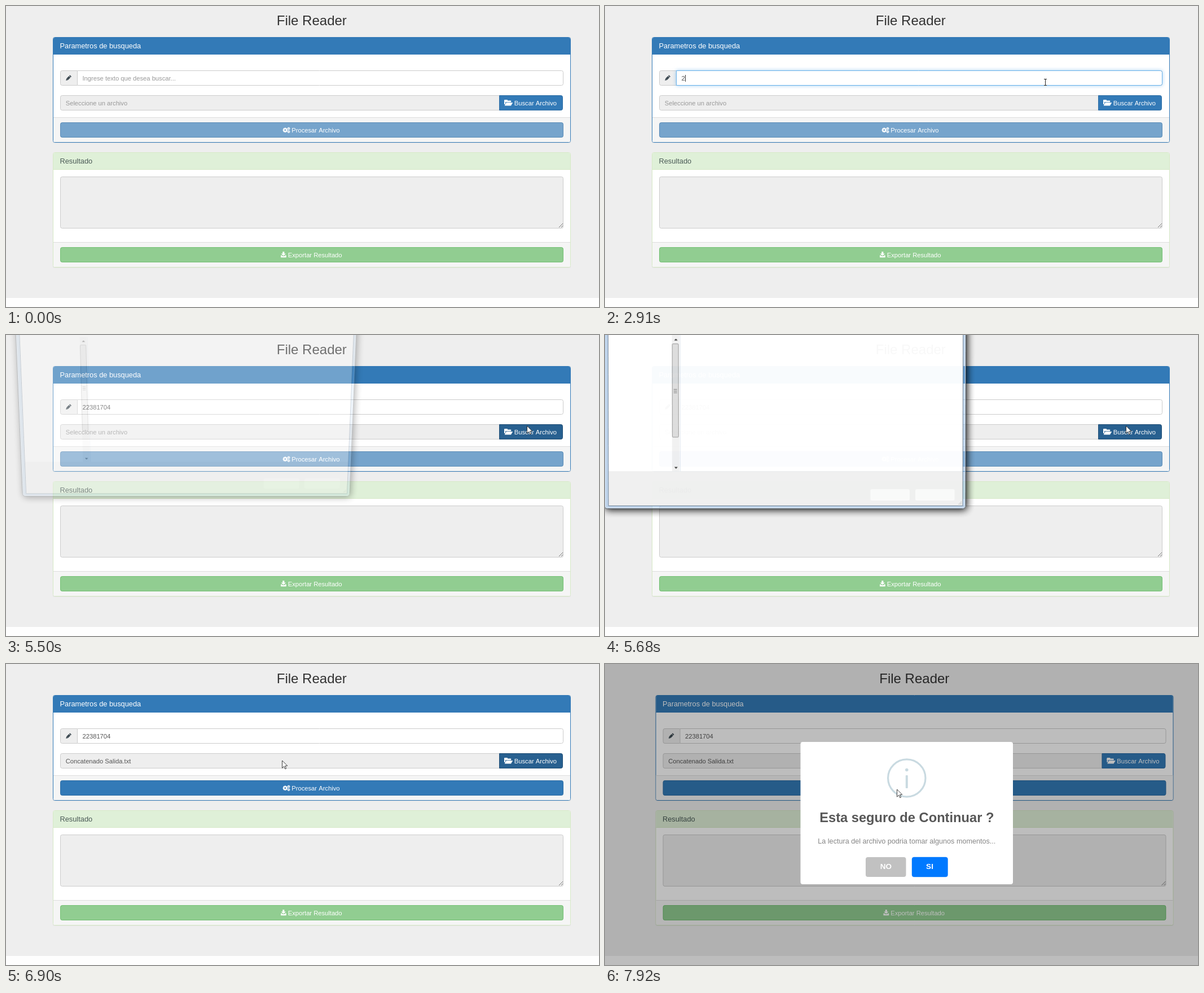
Animation, 1051 px wide and 533 px high, one loop 7.99 s. Source, as an HTML page with a canvas:

```html
<!DOCTYPE html>
<html lang="es">
<head>
<meta charset="utf-8">
<title>File Reader</title>
<style>
html, body { margin: 0; width: 100%; height: 100%; overflow: hidden; background: #eee; }
canvas { display: block; }
</style>
</head>
<body>
<canvas id="stage" width="1051" height="533"></canvas>
<script>
const LOOP = 7990;
const ARIAL = '"Liberation Sans", Arial, sans-serif';
const UI = '"Open Sans", "Noto Sans", sans-serif';
const BLUE = '#337ab7', BLUE_EDGE = '#2e6da4', BLUE_DARK = '#286090', BLUE_DEEP = '#204d74';

const main = document.getElementById('stage').getContext('2d');
const layer = document.createElement('canvas');
layer.width = 720;
layer.height = 360;
const OX = 30, OY = 20;
let c = main;

const clamp = v => Math.max(0, Math.min(1, v));
const ramp = (t, start, length) => clamp((t - start) / length);
const inside = (p, x, y, w, h) => p && p.x >= x && p.x < x + w && p.y >= y && p.y < y + h;

function rect(x, y, w, h, fill) {
  c.fillStyle = fill;
  c.fillRect(x, y, w, h);
}

function rounded(x, y, w, h, r, fill) {
  c.beginPath();
  c.roundRect(x, y, w, h, r);
  c.fillStyle = fill;
  c.fill();
}

// Box on whole pixels with an inner one pixel border.
function framed(x, y, w, h, r, fill, edge) {
  c.beginPath();
  c.roundRect(x + .5, y + .5, w - 1, h - 1, r);
  if (fill) { c.fillStyle = fill; c.fill(); }
  c.strokeStyle = edge;
  c.stroke();
}

function poly(fill, pts, stroke) {
  c.beginPath();
  for (let i = 0; i < pts.length; i += 2) c.lineTo(pts[i], pts[i + 1]);
  c.closePath();
  c.fillStyle = fill;
  c.fill();
  if (stroke) { c.strokeStyle = stroke; c.stroke(); }
}

function disc(x, y, r, fill) {
  c.beginPath();
  c.arc(x, y, r, 0, 7);
  c.fillStyle = fill;
  c.fill();
}

function text(s, x, y, size, color, align = 'left', family = ARIAL, weight = '') {
  c.font = `${weight} ${size}px ${family}`;
  c.textAlign = align;
  c.fillStyle = color;
  c.fillText(s, x, y);
}

const small = (s, x, y, color) => text(s, x, y, 11.2, color);
const label = (s, x, y, color = '#000', align) => text(s, x, y, 9, color, align, UI);

function at(x, y, scale, draw, turn = 0) {
  c.save();
  c.translate(x, y);
  c.rotate(turn);
  c.scale(scale, scale);
  draw();
  c.restore();
}

function vertical(y, h, a, b) {
  const g = c.createLinearGradient(0, y, 0, y + h);
  g.addColorStop(0, a);
  g.addColorStop(1, b);
  return g;
}

/* ---------- cursor ---------- */

// Each move starts where the last one ended: start, end, x, y, sideways bend.
const moves = [
  [70, 230, 942, 398, 0],
  [390, 1170, 866, 157, -220],
  [1250, 1410, 890, 165, 0],
  [1490, 1830, 780, 135, 0],
  [4610, 5360, 923, 161, 0],
  [5890, 6420, 489, 171, -47],
  [7200, 7430, 513, 227, 0],
  [7580, 7660, 517, 222, 0]
];

function cursorAt(t) {
  if (t < moves[0][0]) return null;
  let x = 966, y = 530;
  for (const [start, end, tx, ty, bend] of moves) {
    if (t < start) break;
    const steps = Math.round((end - start) / 78) + 1;
    const u = Math.min(1, (Math.floor((t - start) / (end - start) * (steps - 1)) + 1) / steps);
    const e = 1 - (1 - u) ** 3;
    const dx = tx - x, dy = ty - y, side = 4 * e * (1 - e) * bend / Math.hypot(dx, dy);
    x += dx * e - dy * side;
    y += dy * e + dx * side;
  }
  return { x, y };
}

function drawCursor(p, beam) {
  if (!p) return;
  const x = Math.round(p.x), y = Math.round(p.y);
  if (beam) {
    rect(x, y - 5, 1, 10, '#222');
    for (const end of [-6, 5]) rect(x - 2, y + end, 5, 1, '#222');
    return;
  }
  at(x + .5, y, .8, () =>
    poly('#fff', [0, 0, 0, 16.5, 4, 12.8, 6.6, 18.6, 9, 17.5, 6.5, 11.8, 11.5, 11.5], '#111'));
}

/* ---------- page ---------- */

function pencil() {
  at(110.5, 127.8, 1, () => {
    const ink = '#3d4a52';
    rounded(-2, -6, 4, 2, .8, ink);
    rect(-2, -3.4, 4, 6, ink);
    poly(ink, [-2, 2.6, 2, 2.6, 0, 6]);
  }, Math.PI / 4);
}

function folderOpen() {
  rounded(883, 166, 6, 4, 1, '#fff');
  rounded(883, 167.5, 12.3, 2.7, 1, '#fff');
  rect(883, 168, 2, 6, '#fff');
  poly('#fff', [886.8, 171, 898.2, 171, 895, 176.6, 883.6, 176.6]);
}

function gear(x, y, r, teeth) {
  c.strokeStyle = '#fff';
  c.lineWidth = r * .5;
  c.beginPath();
  c.arc(x, y, r * .58, 0, 7);
  for (let i = 0; i < teeth; i++) {
    const a = i / teeth * Math.PI * 2, cx = Math.cos(a), sy = Math.sin(a);
    c.moveTo(x + cx * r * .7, y + sy * r * .7);
    c.lineTo(x + cx * r, y + sy * r);
  }
  c.stroke();
  c.lineWidth = 1;
}

function gears() {
  gear(494.8, 219.7, 4.2, 8);
  for (const y of [217, 222.6]) gear(501, y, 2.5, 6);
}

function downloadIcon() {
  rect(490.3, 435, 3, 4, '#fff');
  poly('#fff', [487.6, 438.5, 496, 438.5, 491.8, 442.5]);
  rounded(487, 443, 9.7, 2.2, .5, '#fff');
  for (const x of [487, 494.2]) rect(x, 441.5, 2.5, 2, '#fff');
}

function panel(y, h, head, edge, title, color, footY) {
  rounded(83, y + 1, 918, h, 3, 'rgba(0,0,0,.05)');
  framed(83, y, 918, h, 3, '#fff', edge);
  rounded(84, y + 1, 916, 30, [2.5, 2.5, 0, 0], head);
  rect(84, y + 30, 916, 1, edge);
  text(title, 95.5, y + 20, 12.8, color);
  rounded(84, footY, 916, y + h - 1 - footY, [0, 0, 2.5, 2.5], '#f5f5f5');
  rect(84, footY, 916, 1, '#ddd');
}

function wideButton(y, fill, edge, alpha, icon, caption, x) {
  c.globalAlpha = alpha;
  framed(96, y, 892, 27, 3, fill, edge);
  c.globalAlpha = 1;
  icon();
  small(caption, x, y + 17.6, '#fff');
}

const PHRASE = '22381704', FIRST_KEY = 2910, KEY_GAP = 167;
const FOCUS = 2040, BLUR = 5210, BLINK = 530;

function searchField(t) {
  const glow = ramp(t, FOCUS - 10, 160) * (1 - ramp(t, BLUR, 150));
  const right = [0, 3, 3, 0];
  framed(96, 114, 31, 27, [3, 0, 0, 3], '#eee', '#ccc');
  pencil();
  c.save();
  c.shadowColor = `rgba(102,175,233,${.6 * glow})`;
  c.shadowBlur = 6;
  rounded(126, 114, 862, 27, right, '#fff');
  c.restore();
  framed(126, 114, 862, 27, right, '#fff', '#ccc');
  framed(126, 114, 862, 27, right, null, `rgba(102,175,233,${glow})`);

  const count = Math.max(0, Math.min(PHRASE.length, Math.floor((t - FIRST_KEY) / KEY_GAP) + 1));
  if (count) small(PHRASE.slice(0, count), 135.5, 131.8, '#555');
  else small('Ingrese texto que desea buscar...', 135.5, 131.8, '#999');

  const touched = count ? FIRST_KEY + KEY_GAP * (count - 1) : FOCUS;
  if (t >= FOCUS && t < BLUR && (t - touched) % (2 * BLINK) < BLINK)
    rect(136 + Math.round(count * 6.3), 122, 1, 12, '#333');
}

function page(t, p) {
  const loaded = t >= 6900;
  text('File Reader', 541.8, 33.7, 24, '#333', 'center');

  panel(55, 187, BLUE, BLUE, 'Parametros de busqueda', '#fff', 197);
  searchField(t);
  framed(96, 158, 779, 27, [3, 0, 0, 3], '#eee', '#ccc');
  small(loaded ? 'Concatenado Salida.txt' : 'Seleccione un archivo', 105.7, 175.6, loaded ? '#555' : '#999');
  const lit = t >= BLUR && t < 7430 || inside(p, 874, 158, 113, 27);
  framed(874, 158, 113, 27, [0, 3, 3, 0], lit ? BLUE_DARK : BLUE, lit ? BLUE_DEEP : BLUE_EDGE);
  folderOpen();
  small('Buscar Archivo', 900.8, 175.6, '#fff');

  let go = BLUE;
  if (t >= 7200 && t < 7920 && inside(p, 96, 206, 892, 27)) go = t < 7810 ? BLUE_DARK : BLUE_DEEP;
  wideButton(206, go, BLUE_EDGE, loaded ? 1 : .65, gears, 'Procesar Archivo', 506.3);

  panel(259, 204, '#dff0d8', '#d6e9c6', 'Resultado', '#4a5a56', 418);
  framed(96, 302, 892, 92, 3, '#eee', '#ccc');
  c.strokeStyle = '#777';
  c.beginPath();
  for (const size of [7, 3]) {
    c.moveTo(987 - size, 392);
    c.lineTo(987, 392 - size);
  }
  c.stroke();
  wideButton(427, '#5cb85c', '#4cae4c', .65, downloadIcon, 'Exportar Resultado', 499.8);
}

/* ---------- file dialog ---------- */

// Every icon fills a box of 38 by 38.
const icons = {
  folder() {
    ['#d8a93f', '#f3d67d', '#fbe9a9'].forEach((tone, i) => {
      const x = 22 - i * 7;
      poly(tone, [x, 1 + i, x + 10, 4 + i, x + 10, 35 + i, x, 31 + i]);
    });
  },
  lib() {
    for (let i = 0; i < 3; i++) framed(3 + i * 8, 1 + i * 3, 18, 28, 1, '#f1d078', '#cda044');
    framed(0, 15, 38, 21, 2, vertical(15, 21, '#fdeeb4', '#efc75e'), '#d8ac48');
    rounded(7, 30, 24, 7, 3, '#8cc4ea');
  },
  user() {
    icons.folder();
    rounded(17, 24, 18, 14, [8, 8, 1, 1], '#5f6f58');
    disc(26, 18, 6, '#c08d5c');
  },
  home() {
    ['#4f9ad8', '#2f62b8', '#4da23c'].forEach((tone, i) => {
      const x = 25 - 16 * (i % 2), y = 9 + i * 9;
      disc(x, y, 9, tone);
      disc(x - 2, y - 3, 4, 'rgba(255,255,255,.5)');
    });
    disc(34, 19, 5, '#9bd0ee');
  },
  pc() {
    rounded(1, 9, 12, 22, 1, '#c9cfd5');
    poly('#2f3b48', [9, 3, 37, 7, 35, 29, 10, 30]);
    poly('#2456b4', [12, 6, 34, 9, 33, 26, 12, 27]);
    poly('#86b6ee', [12, 6, 34, 9, 12, 22]);
    rounded(13, 32, 20, 4, 2, '#bcc4cc');
  },
  net() {
    disc(16, 16, 16, '#2f7fc4');
    disc(10, 12, 7, '#5aae50');
    disc(21, 6, 4, '#5aae50');
    at(12, 12, .68, icons.pc);
  },
  note() {
    framed(5, 3, 28, 34, 1, '#fafbfc', '#9aa3ab');
    for (let y = 9; y < 35; y += 3) rect(8, y, 22, 1, '#c6cdd4');
    for (let x = 7; x < 31; x += 3) rect(x, 1, 1.5, 4, '#77828c');
  },
  star() {
    const pts = [];
    for (let i = 0; i < 10; i++) {
      const a = i * Math.PI / 5 - Math.PI / 2, r = i % 2 ? 9 : 20;
      pts.push(19 + r * Math.cos(a), 20 + r * Math.sin(a));
    }
    poly('#f8b63c', pts, '#d98a1c');
  },
  down() {
    icons.folder();
    rect(24, 16, 8, 11, '#2f7fd0');
    poly('#2f7fd0', [18, 26, 38, 26, 28, 38]);
  },
  cloud() { disc(19, 19, 15, '#1f7fd6'); },
  image() {
    framed(1, 5, 36, 28, 1, '#e8f2fa', '#6f8ba5');
    rect(5, 9, 28, 20, vertical(9, 20, '#6fb1e6', '#4d8a4a'));
  },
  music() {
    rect(15, 2, 4, 28, '#2b78c8');
    poly('#2b78c8', [17, 2, 32, 12, 29, 20, 17, 11]);
    disc(12, 30, 7, '#2b78c8');
  },
  video() {
    rect(3, 3, 32, 32, '#37424d');
    rect(9, 6, 20, 26, '#6fa9dc');
    for (let y = 6; y < 33; y += 7) for (const x of [4, 31]) rect(x, y, 3, 3, '#fff');
  }
};

const groups = [
  ['star Favoritos', 'down Descargas', 'cloud Nublero', 'pc Escritorio', 'note Sitios recientes'],
  ['lib Bibliotecas', 'note Documentos', 'image Imágenes', 'music Música', 'video Vídeos'],
  ['home Grupo en el hogar']
];

const SYS = 'Carpeta de sistema', DOC = 'Documento de texto', PICKED = 'Concatenado Salida.txt';
const files = [
  ['lib', 'Bibliotecas', SYS], ['home', 'Grupo en el hogar', SYS],
  ['user', 'PC-ESTUDIO', SYS], ['pc', 'Equipo', SYS],
  ['net', 'Red', SYS], ['folder', 'ReaderFile', 'Carpeta de archivos'],
  ['note', 'comandos linux.txt', DOC, '37 bytes'], ['note', PICKED, DOC, '3,87 MB'],
  ['note', 'PENDIENTES CD.txt', DOC, '92 bytes'], ['note', 'php artisan.txt', DOC, '73 bytes']
];

function sidebar() {
  let y = 17;
  for (const group of groups) {
    group.forEach((entry, i) => {
      const [icon, ...words] = entry.split(' '), x = i ? 46 : 38;
      at(x - 17, y - 6, .31, icons[icon]);
      label(words.join(' '), x - .5, y + 3.2);
      y += 16.9;
    });
    y += 16.9;
  }
}

function fileList(t, p) {
  const tile = (a, b, edge) => framed(349, 141, 202, 42, 2, vertical(141, 42, a, b), edge);
  if (t >= 6420) tile('#e3f1fd', t < 6570 ? '#cfe6fb' : '#b9dbf9', '#84acdd');
  else if (inside(p, 349, 141, 202, 42)) tile('#fbfdff', '#edf5fd', '#c4dff5');
  files.forEach(([icon, name, kind, size], i) => {
    const x = i % 2 ? 395.3 : 190.8;
    const y = 23 + (i >> 1) * 45 - (size ? 6 : 0);
    at(x - 42, y - (size ? 8 : 15), .98, icons[icon]);
    label(name, x, y);
    label(kind, x, y + 13, '#666');
    if (size) label(size, x, y + 26, '#666');
  });
}

const arrow = (x, y, d) => poly('#222', [x - 3, y - 1.5 * d, x + 3, y - 1.5 * d, x, y + 1.5 * d]);
const raised = (x, y, w, h, edge) => framed(x, y, w, h, 2, vertical(y, h, '#f5f5f5', '#d4d4d4'), edge);

function glassFrame() {
  c.save();
  c.shadowColor = '#000';
  c.shadowBlur = 14;
  c.shadowOffsetX = c.shadowOffsetY = 2;
  rounded(-3, -40, 644, 349, 5, '#000');
  c.restore();
  c.globalCompositeOperation = 'destination-out';
  rounded(-3, -40, 644, 349, 5, '#000');
  c.globalCompositeOperation = 'source-over';
  framed(-3, -40, 644, 349, 5, 'rgba(150,190,232,.55)', '#3f4c58');
  framed(-2, -40, 642, 348, 4, null, 'rgba(255,255,255,.6)');
  framed(4, -40, 632, 344, 0, '#fff', '#6f8296');
}

function scrollbar(thumb) {
  rect(118, 0, 13, 242, '#f1f1f1');
  rect(132, 0, 1, 242, '#dfe6ee');
  framed(118, 15, 12, thumb, 1.5, '#dcdcdc', '#9a9a9a');
  for (let i = -1; i < 2; i++) rect(121, Math.round(15 + thumb / 2) + i * 3, 6, 1, '#777');
  arrow(125, 8, -1);
  arrow(125, 236, 1);
}

function controls(t) {
  label('Nombre:', 147, 262.3, '#000', 'right');
  framed(151, 249, 310, 20, 1, '#fff', '#9cc6e8');
  arrow(453.5, 260, 1);
  if (t >= 6420) label(PICKED, 155, 262.3);
  raised(470, 249, 152, 19, '#808080');
  label('Archivos personalizados', 473.5, 262.3);
  arrow(614.5, 259, 1);
  raised(471, 274, 70, 20, '#3c7fb1');
  framed(472, 275, 68, 18, 1, null, '#8fd6f3');
  rect(529, 275, 1, 18, '#3c7fb1');
  label('Abrir', 499.5, 286.5, '#000', 'center');
  arrow(534.5, 284, 1);
  raised(551, 274, 70, 20, '#808080');
  label('Cancelar', 586, 286.5, '#000', 'center');
}

function dialog(t, p, full) {
  glassFrame();
  rect(5, 242, 630, 61, '#f0f0f0');
  scrollbar(full ? 138 : 167);
  if (full) {
    sidebar();
    fileList(t, p);
    controls(t);
  } else {
    for (const x of [471, 551]) rounded(x, 274, 70, 20, 2, '#fafafa');
  }
  for (let i = 0; i < 3; i++)
    for (let j = 0; j <= i; j++) rect(632 - 2 * j, 296 + 2 * i, 1, 1, '#aaa');
}

// Draws the layer row by row, narrower towards the bottom.
function drawTilted(tilt) {
  const sy = 1 - .087 * tilt;
  for (let y = 0; y < 325; y++) {
    const row = (y - 3.6 * tilt) / sy + OY;
    if (row + 1 / sy > layer.height) break;
    const sx = 1 - tilt * (.062 + .038 * y / 286);
    c.drawImage(layer, 0, row, layer.width, 1 / sy, 320 - (320 + OX) * sx, y, layer.width * sx, 1);
  }
}

function drawDialog(t, p) {
  const open = ramp(t, 5420, 270), close = ramp(t, 6700, 200);
  const alpha = open * (1 - close), tilt = 1.42 * (1 - open) + close;
  if (!alpha) return;
  c = layer.getContext('2d');
  c.setTransform(1, 0, 0, 1, 0, 0);
  c.clearRect(0, 0, layer.width, layer.height);
  c.translate(OX, OY);
  dialog(t, p, t >= 5750);
  c = main;
  c.globalAlpha = alpha;
  if (tilt) drawTilted(tilt);
  else c.drawImage(layer, -OX, -OY);
  c.globalAlpha = 1;
}

/* ---------- confirmation ---------- */

function confirmBox() {
  const tone = '#c9dae1', mid = 534.8;
  rect(0, 0, 1051, 533, 'rgba(0,0,0,.26)');
  rounded(346.5, 138, 376.5, 252, 4, '#fff');
  c.strokeStyle = tone;
  c.lineWidth = 3.2;
  c.beginPath();
  c.arc(mid, 202, 33.2, 0, 7);
  c.stroke();
  c.lineWidth = 1;
  disc(mid, 187.5, 2.8, tone);
  rounded(mid - 2, 197, 4, 23, 1, tone);
  text('Esta seguro de Continuar ?', mid, 280, 23.7, '#575757', 'center', ARIAL, 'bold');
  text('La lectura del archivo podria tomar algunos momentos...', mid, 318, 12.63, '#868686', 'center');
  rounded(462, 342, 71.5, 35, 4, '#c1c1c1');
  rounded(543.5, 341.5, 64.5, 36, 4.5, '#9fcbfa');
  rounded(544, 342, 63.5, 35, 4, '#0079ff');
  text('NO', 497.8, 363.3, 13.5, '#fff', 'center', ARIAL, 'bold');
  text('SI', 575.5, 363.3, 13.5, '#fff', 'center', ARIAL, 'bold');
}

function render(t) {
  const p = cursorAt(t), asking = t >= 7920;
  rect(0, 0, 1051, 533, '#eee');
  rect(0, 517, 1051, 16, '#fefefe');
  at(asking ? 6.5 : 0, 0, 1, () => page(t, p));
  drawDialog(t, p);
  if (asking) confirmBox();
  drawCursor(p, t < 5420 && inside(p, 126, 114, 862, 27));
}

const begin = performance.now();
function tick() {
  render((performance.now() - begin) % LOOP);
  requestAnimationFrame(tick);
}
tick();
</script>
</body>
</html>
```
